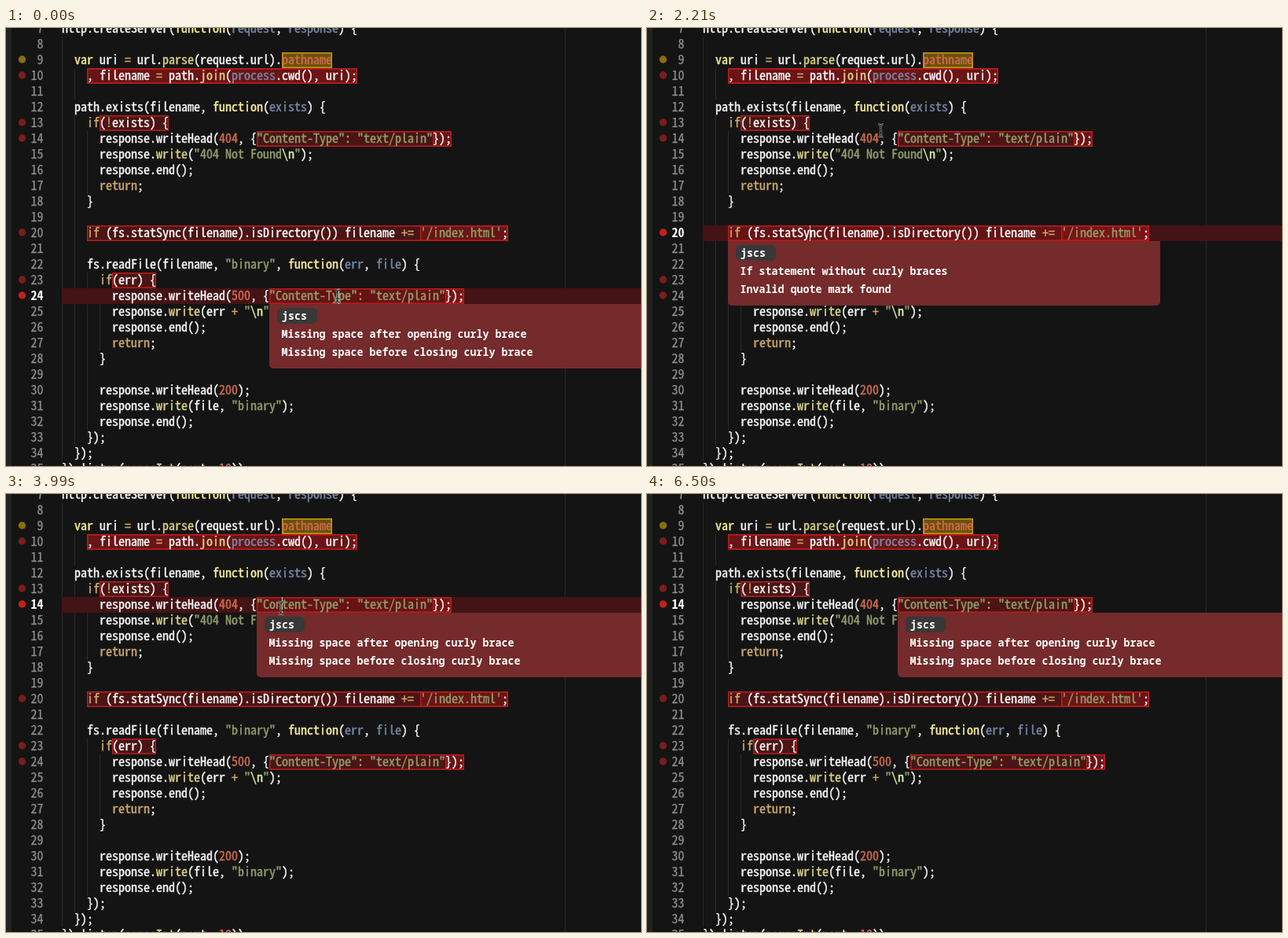
These frames come from a looping animation (808x557 px, 6570 ms). An HTML page with a canvas:

```html
<!DOCTYPE html>
<html lang="en">
<head>
<meta charset="utf-8">
<title>Lint messages in a code editor</title>
<style>
html, body { margin: 0; width: 100%; height: 100%; overflow: hidden; background: #141414; }
canvas { display: block; }
</style>
</head>
<body>
<canvas id="stage" width="808" height="557"></canvas>
<script>
const ctx = document.getElementById('stage').getContext('2d');
const W = 808, H = 557, LOOP = 6570, TICK = 147.7;
const CHAR = 8, ROW = 20, LEFT = 71, FIRST = 7;

// picks the font size whose character advance is CHAR
function fitFont(weight, families) {
  ctx.font = `${weight} 100px ${families}`;
  const size = CHAR * 100 / ctx.measureText('0').width;
  return `${weight} ${size.toFixed(3)}px ${families}`;
}

const MONO = '"Noto Sans Mono CJK JP", "Noto Sans Mono CJK SC", "Noto Sans Mono", monospace';
const CODE_FONT = fitFont(400, MONO);
const BOLD_FONT = fitFont(700, MONO);
const TIP_FONT = fitFont(600, '"Noto Sans Mono", "DejaVu Sans Mono", monospace');

const CODE = String.raw`http.createServer(function(request, response) {

  var uri = url.parse(request.url).pathname
    , filename = path.join(process.cwd(), uri);

  path.exists(filename, function(exists) {
    if(!exists) {
      response.writeHead(404, {"Content-Type": "text/plain"});
      response.write("404 Not Found\n");
      response.end();
      return;
    }

    if (fs.statSync(filename).isDirectory()) filename += '/index.html';

    fs.readFile(filename, "binary", function(err, file) {
      if(err) {
        response.writeHead(500, {"Content-Type": "text/plain"});
        response.write(err + "\n");
        response.end();
        return;
      }

      response.writeHead(200);
      response.write(file, "binary");
      response.end();
    });
  });
}).listen(parseInt(port, 10));`.split('\n');

const COLORS = {
  plain: '#f8f8f8', string: '#8f9d6a', escape: '#ddf2a4', number: '#cf6a4c',
  storage: '#f9ee98', keyword: '#cda869', call: '#dad085', param: '#7587a6'
};

// line, first column, end column; overlaps add up
const MARKS = [
  [10, 4, 47], [10, 4, 47], [13, 6, 17], [14, 31, 62], [14, 59, 62], [20, 4, 71],
  [20, 57, 71], [23, 8, 15], [24, 33, 64], [24, 61, 64]
];
const DOTS = [9, 10, 13, 14, 20, 23, 24];

const BRACES = ['Missing space after opening curly brace', 'Missing space before closing curly brace'];
const QUOTES = ['If statement without curly braces', 'Invalid quote mark found'];

// selected line per period, with caret column and the time its blink starts
const STATES = [
  { from: 0, line: 24, caret: 44, blink: 450, tip: 33, text: BRACES },
  { from: 10, line: 20, caret: 17, blink: 1350, tip: 4, text: QUOTES },
  { from: 27, line: 14, caret: 35, blink: 3960, tip: 31, text: BRACES }
];

// tick, x, y
const PATH = [
  [0, 422, 341], [2, 405, 332], [5, 270, 280], [8, 206.5, 261.5], [10, 206.5, 261.5],
  [13, 297.5, 130.5], [19, 297.5, 130.5], [22, 318, 112], [26, 350, 145], [29, 350, 145],
  [31, 230, 106], [33, 159, 150], [35, 370, 270], [37, 607, 413], [39, 725.5, 528]
];

const rowTop = n => n * ROW - 149;
const colX = c => LEFT + c * CHAR;

function rect(x, y, w, h, color) {
  ctx.fillStyle = color;
  ctx.fillRect(x, y, w, h);
}

function text(str, x, mid, color, font = CODE_FONT, swell = 0) {
  ctx.font = font;
  ctx.fillStyle = ctx.strokeStyle = color;
  ctx.fillText(str, x, mid + 5);
  if (swell) {
    ctx.lineWidth = swell;
    ctx.strokeText(str, x, mid + 5);
  }
}

function round(x, y, w, h, radii, color) {
  ctx.beginPath();
  ctx.roundRect(x, y, w, h, radii);
  ctx.fillStyle = color;
  ctx.fill();
}

function kind(word, before) {
  if (/^["']/.test(word)) return 'string';
  if (/^\d/.test(word)) return 'number';
  if (/^(var|function)$/.test(word)) return 'storage';
  if (/^(if|return|[=+!:]+)$/.test(word)) return 'keyword';
  if (/^(parse|join|write|parseInt)$/.test(word)) return 'call';
  if (word === 'pathname') return 'number';
  if (word === 'process' || (/^\w/.test(word) && /function\([^)]*$/.test(before))) return 'param';
  return 'plain';
}

function tokenize(line) {
  const out = [];
  for (const m of line.matchAll(/"[^"]*"|'[^']*'|\w+|[=+!:]+|[^\s\w"'=+!:]+/g)) {
    const type = kind(m[0], line.slice(0, m.index));
    if (type !== 'string') {
      out.push([m[0], m.index, COLORS[type]]);
      continue;
    }
    for (const part of m[0].matchAll(/\\n|[^\\]+/g)) {
      const color = part[0] === '\\n' ? COLORS.escape : COLORS.string;
      out.push([part[0], m.index + part.index, color]);
    }
  }
  return out;
}

const tokens = CODE.map(tokenize);
const depth = CODE.map(s => s ? s.search(/\S/) / 2 : -1);
const guides = depth.map((d, i) => d < 0 ? Math.max(depth[i - 1], depth[i + 1]) : d);

function box(line, a, b, fill, edge) {
  const x = colX(a), y = rowTop(line), w = (b - a) * CHAR;
  rect(x, y, w, ROW, fill);
  ctx.strokeStyle = edge;
  ctx.lineWidth = 1.6;
  ctx.strokeRect(x + 0.8, y + 0.8, w - 1.6, ROW - 1.6);
}

function drawGuides() {
  guides.forEach((n, i) => {
    for (let g = 0; g < n; g++) rect(LEFT + g * 16, rowTop(FIRST + i), 1, ROW, '#2b2b2b');
  });
  rect(711, 0, 1, H, '#292929');
}

function drawGutter(active) {
  rect(0, 0, 7, H, '#222222');
  for (const n of DOTS) {
    ctx.beginPath();
    ctx.arc(20.5, rowTop(n) + 9, 4.7, 0, 7);
    ctx.fillStyle = n === 9 ? '#8c6d0c' : n === active ? '#c41f1c' : '#7b1d1b';
    ctx.fill();
  }
  CODE.forEach((_, i) => {
    const n = FIRST + i, label = String(n), x = 47.5 - label.length * CHAR, mid = rowTop(n) + 10;
    if (n === active) text(label, x, mid, '#ffffff', BOLD_FONT);
    else text(label, x, mid, '#8f8f8f', CODE_FONT, 0.25);
  });
}

function drawCode() {
  MARKS.forEach(m => box(...m, 'rgba(150,20,22,0.42)', '#b71c1c'));
  box(9, 35, 43, '#6a500d', '#c4970f');
  tokens.forEach((list, i) => {
    const mid = rowTop(FIRST + i) + 10;
    list.forEach(([word, col, color]) => text(word, colX(col), mid, color, CODE_FONT, 0.4));
  });
}

function drawTip(state) {
  const x = colX(state.tip), y = rowTop(state.line) + ROW;
  round(x, y, 550, 82, [0, 0, 5, 5], '#752a2b');
  round(x + 10, y + 5, 51, 20, 6, '#383838');
  text('jscs', x + 16, y + 15, '#ffffff', TIP_FONT);
  state.text.forEach((s, i) => text(s, x + 15.5, y + 38 + 23 * i, '#ffffff', TIP_FONT));
}

function pointerAt(k) {
  const i = Math.max(1, PATH.findIndex(p => p[0] >= k));
  const [k0, x0, y0] = PATH[i - 1], [k1, x1, y1] = PATH[i];
  const u = (k - k0) / (k1 - k0);
  return [x0 + (x1 - x0) * u, y0 + (y1 - y0) * u];
}

function drawPointer([x, y]) {
  ctx.beginPath();
  ctx.moveTo(x - 3.2, y - 8);
  ctx.quadraticCurveTo(x, y - 8, x, y - 5);
  ctx.lineTo(x, y + 5);
  ctx.quadraticCurveTo(x, y + 8, x - 3.2, y + 8);
  ctx.moveTo(x + 3.2, y - 8);
  ctx.quadraticCurveTo(x, y - 8, x, y - 5);
  ctx.moveTo(x, y + 5);
  ctx.quadraticCurveTo(x, y + 8, x + 3.2, y + 8);
  ctx.moveTo(x - 2, y + 3);
  ctx.lineTo(x + 2, y + 3);
  ctx.strokeStyle = 'rgba(170,170,170,0.8)';
  ctx.lineWidth = 2.4;
  ctx.stroke();
  ctx.strokeStyle = '#1a1a1a';
  ctx.lineWidth = 1;
  ctx.stroke();
}

function draw(t) {
  const k = Math.floor((t + 11) / TICK);
  const state = STATES.findLast(s => k >= s.from);
  const focused = k < 44;
  const top = rowTop(state.line);

  rect(0, 0, W, H, '#141414');
  drawGuides();
  if (focused) rect(LEFT, top, W - LEFT, ROW, '#431315');
  drawGutter(state.line);
  drawCode();
  drawTip(state);

  // the caret blinks every 400 ms, sampled at the tick
  const phase = Math.floor((k * TICK - state.blink) / 400);
  if (focused && phase % 2 === 0) rect(colX(state.caret), top, 1, ROW, '#d0d0d0');
  if (k < 40) drawPointer(pointerAt(k));
}

function frame(now) {
  draw(now % LOOP);
  requestAnimationFrame(frame);
}
requestAnimationFrame(frame);
</script>
</body>
</html>
```
